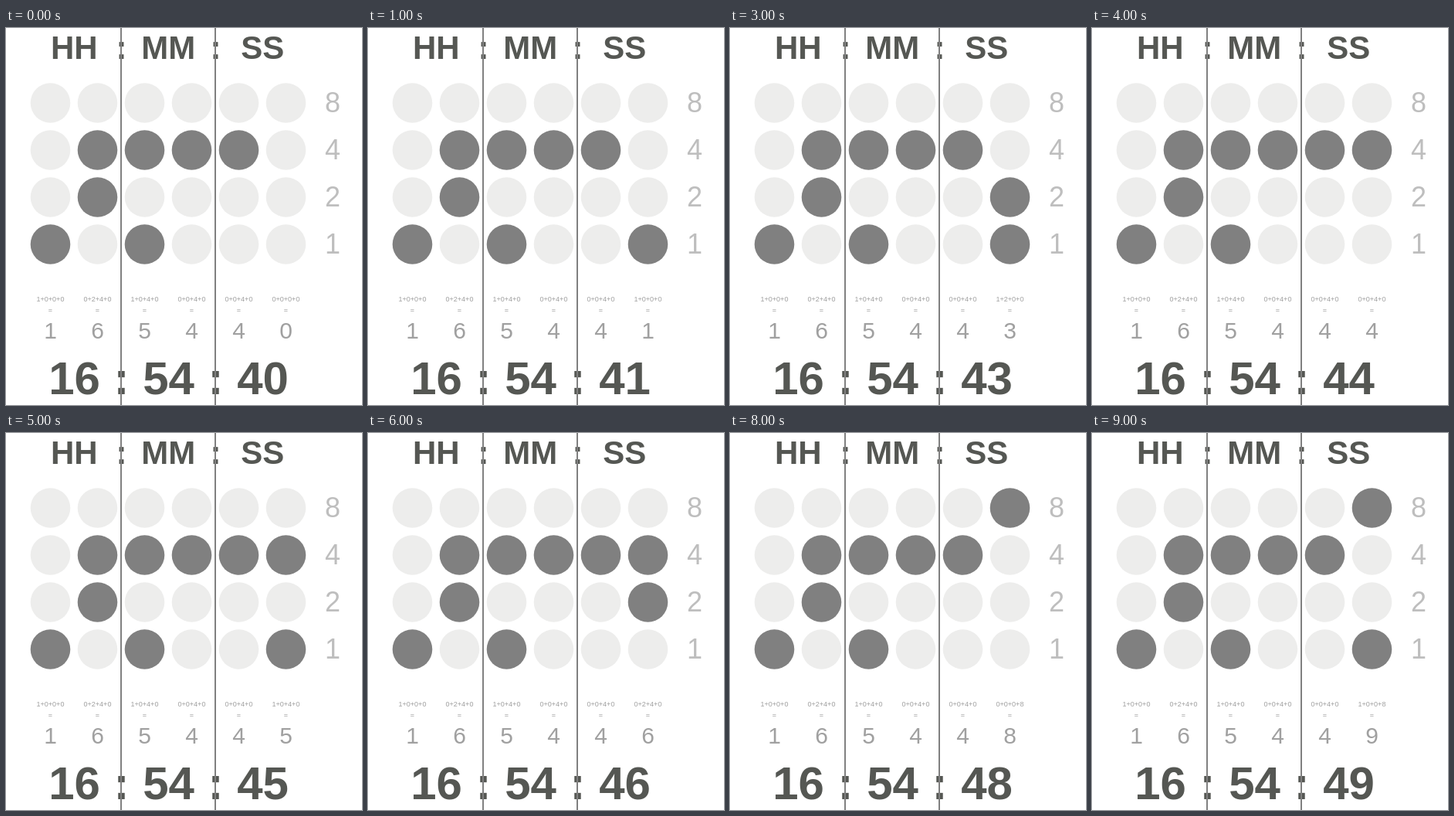
These frames come from a looping animation (461 px wide and 488 px high, 10000 ms). An HTML page:

```html
<!DOCTYPE html>
<html lang="en">
<head>
<meta charset="utf-8">
<title>Binary clock</title>
<style>
  html, body { margin: 0; width: 100%; height: 100%; overflow: hidden; background: #fff; }
  svg { display: block; width: 461px; height: 488px; }
  text { font-family: "Liberation Sans", Arial, sans-serif; text-anchor: middle; }
  .head { font-size: 42px; font-weight: bold; fill: #555753; }
  .time { font-size: 60px; font-weight: bold; fill: #555753; }
  .weight { font-size: 36px; fill: #bebebe; }
  .digit { font-size: 30px; fill: #a0a0a0; }
  .sum { font-size: 9px; fill: #a0a0a0; }
  .divider { stroke: #808080; stroke-width: 2; }
</style>
</head>
<body>
<svg id="stage" viewBox="0 0 461 488"></svg>
<script>
const LOOP = 10000;
const START = "165440";
const WEIGHTS = [8, 4, 2, 1];
const ON = "#808080", OFF = "#ededec";
const stage = document.getElementById("stage");

function add(tag, attrs, content = "") {
  const node = document.createElementNS("http://www.w3.org/2000/svg", tag);
  for (const key in attrs) node.setAttribute(key, attrs[key]);
  node.textContent = content;
  return stage.appendChild(node);
}
const label = (cls, x, y, content) => add("text", { class: cls, x, y }, content);

const columnX = i => 57.5 + 61 * i;
const rowY = i => 97 + 61 * i;

["HH", "MM", "SS"].forEach((name, i) => label("head", 88.3 + 122 * i, 40, name));
const pairs = [0, 1, 2].map(i => label("time", 88.5 + 122 * i, 474, ""));

for (const x of [149, 271]) {
  label("head", x + 0.5, 40, ":");
  label("time", x + 0.5, 474, ":");
  add("line", { class: "divider", x1: x, x2: x, y1: 0, y2: 488 });
}

WEIGHTS.forEach((weight, i) => label("weight", 423, rowY(i) + 12, weight));

const columns = [...START].map((_, i) => {
  const x = columnX(i);
  label("sum", x, 368, "=");
  return {
    dots: WEIGHTS.map((_, row) => add("circle", { cx: x, cy: rowY(row), r: 25.8 })),
    sum: label("sum", x, 354, ""),
    digit: label("digit", x, 402, "")
  };
});

function show(second) {
  const digits = [...START].map(Number);
  digits[5] += second;
  columns.forEach(({ dots, sum, digit }, i) => {
    const parts = WEIGHTS.map(weight => digits[i] & weight);
    dots.forEach((dot, row) => dot.setAttribute("fill", parts[row] ? ON : OFF));
    sum.textContent = parts.reverse().join("+");
    digit.textContent = digits[i];
  });
  pairs.forEach((pair, i) => pair.textContent = `${digits[2 * i]}${digits[2 * i + 1]}`);
}

const start = performance.now();
let shown = 0;
function tick() {
  const second = Math.floor((performance.now() - start) % LOOP / 1000);
  if (second !== shown) show(shown = second);
  requestAnimationFrame(tick);
}
show(0);
tick();
</script>
</body>
</html>
```
